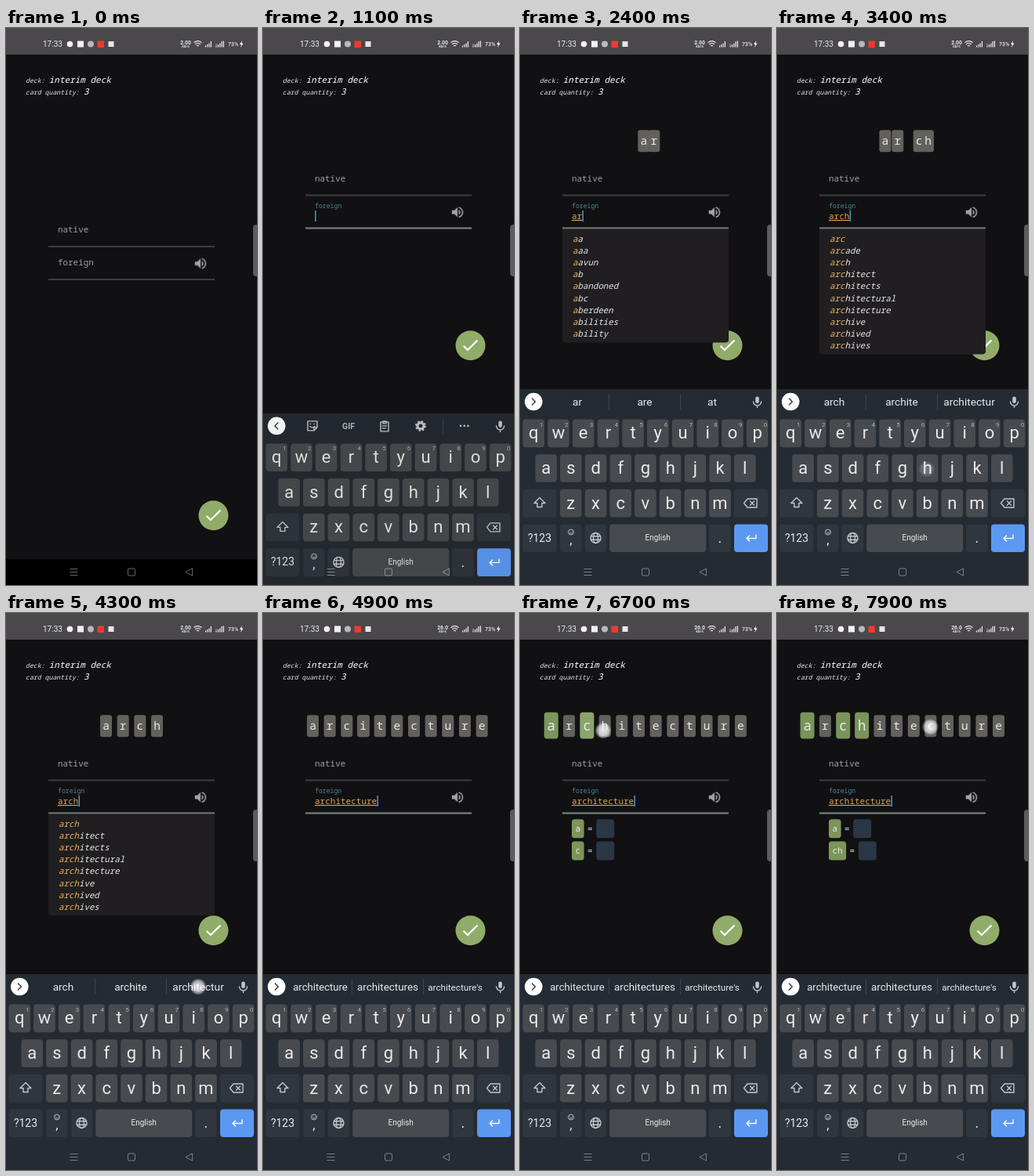
An HTML page for the animation above (8000 ms loop, 320 by 711 pixels).

```html
<!DOCTYPE html>
<html lang="en">
<head>
<meta charset="utf-8">
<title>Card editor</title>
<style>
html, body { margin: 0; width: 100%; height: 100%; overflow: hidden; background: #111012; }
svg { display: block; width: 320px; height: 711px; }
text { font-family: Roboto, sans-serif; fill: #e8eaec; }
.mono, .mono text { font-family: "Noto Sans Mono", monospace; }
.mid { text-anchor: middle; }
.it { font-style: italic; }
.line { fill: none; stroke: #c3c7ca; stroke-width: 1.4; stroke-linecap: round; stroke-linejoin: round; }
.nav { fill: none; stroke: #fff; stroke-opacity: .4; stroke-width: 1; }
#kb, #form, #fab, #label, #focus { animation: 8s linear infinite; }
#kb { animation-name: rise; }
#form { animation-name: lift; }
#fab { animation-name: hop; }
#label { animation-name: float; font-size: 10.9px; }
#focus { animation-name: show; }
@keyframes rise {
  0%, 11.1% { transform: translateY(250px); opacity: .6; animation-timing-function: cubic-bezier(.2, .6, .4, 1); }
  16.2%, 100% { transform: none; opacity: 1; }
}
@keyframes lift { 0%, 11.9% { transform: none; } 12%, 100% { transform: translateY(-65.5px); } }
@keyframes hop { 0%, 11.9% { transform: none; } 12%, 100% { transform: translateY(-217px); } }
@keyframes float {
  0%, 11% { transform: translate(66px, 303px); fill: #a09fa1; }
  13%, 100% { transform: translate(66px, 295px) scale(.75); fill: #4b8693; }
}
@keyframes show { 0%, 11% { opacity: 0; } 13%, 100% { opacity: 1; } }
</style>
</head>
<body>
<svg viewBox="0 0 320 711">
  <defs>
    <radialGradient id="glow">
      <stop offset="0" stop-color="#fff" stop-opacity=".85"/>
      <stop offset=".65" stop-color="#fff" stop-opacity=".65"/>
      <stop offset="1" stop-color="#fff" stop-opacity=".12"/>
    </radialGradient>
  </defs>
  <rect width="320" height="711" fill="#111012"/>
  <rect width="320" height="34" fill="#4a484b"/>
  <rect y="678" width="320" height="33" fill="#000"/>

  <g id="status">
    <text x="47" y="24" font-size="10">17:33</text>
    <circle cx="81.5" cy="20.5" r="3.8" fill="#f2f2f2"/>
    <rect x="91" y="16.5" width="8" height="8" fill="#f2f2f2"/>
    <circle cx="108" cy="20.5" r="4" fill="#b9b8ba"/>
    <rect x="116.5" y="16.5" width="8.5" height="8.5" fill="#f0392f"/>
    <rect x="130.5" y="17" width="7" height="7" fill="#e6e6e6"/>
    <text id="speed" class="mid" x="229" y="20.5" font-size="6.8" font-weight="700">2.00</text>
    <text class="mid" x="229" y="25" font-size="4.2" font-weight="700">KB/S</text>
    <g fill="none" stroke="#eee" stroke-width="1.2">
      <path d="M239.5 18.6q5-4 10 0M241.2 20.8q3.3-2.6 6.6 0M243 22.9q1.500-1.200 3 0"/>
      <path d="M254.500 24.500v-2m2.300 2v-3.500m2.300 3.500v-5m2.300 5v-7.500M268 24.500v-2m0-1v-1m2.500 4v-3.500m2.300 3.500v-5m2.300 5v-7.500m2.300 7.500v-8"/>
    </g>
    <text x="283" y="23" font-size="7" font-weight="500">73%</text>
    <path d="M301 16l-3 5h2l-1 4 3.500-5.500h-2.200z" fill="#fff"/>
  </g>

  <g class="mono it">
    <text x="25" y="70" font-size="8.2">deck:</text>
    <text x="54.700" y="70" font-size="11" font-weight="500" style="fill:#fff">interim deck</text>
    <text x="25" y="85" font-size="8.2">card quantity:</text>
    <text x="99" y="85" font-size="11" font-weight="500" style="fill:#fff">3</text>
  </g>

  <g id="fab">
    <circle cx="264.500" cy="622.300" r="19" fill="#91ab69"/>
    <path transform="translate(251.100 608.700) scale(1.1)" fill="#fff" d="M9 16.170L4.830 12l-1.420 1.410L9 19 21 7l-1.410-1.410z"/>
  </g>

  <g id="form" class="mono">
    <text x="66" y="261" font-size="10.9" style="fill:#a09fa1">native</text>
    <text id="label">foreign</text>
    <path d="M54 279h212M54 321h212" stroke="#6c6b6d"/>
    <path id="focus" d="M54 321h212" stroke="#8b989c" stroke-width="1.600"/>
    <path transform="translate(238.400 291.100) scale(.8)" fill="#a3a2a4" d="M3 9v6h4l5 5V4L7 9H3zm13.500 3c0-1.770-1.020-3.290-2.500-4.030v8.050c1.480-.730 2.500-2.250 2.500-4.020zM14 3.230v2.060c2.890.860 5 3.540 5 6.710s-2.110 5.850-5 6.710v2.060c4.010-.910 7-4.490 7-8.770s-2.990-7.860-7-8.770z"/>
  </g>
  <text id="typed" class="mono" x="66" y="244" font-size="11" text-decoration="underline" style="fill:#dea24c"></text>
  <rect id="caret" y="233" width="1.500" height="14" fill="#4e9cbd"/>
  <g id="list" class="mono it"></g>
  <g id="pairs" class="mono"></g>
  <g id="tiles" class="mono"></g>
  <rect x="315" y="251" width="9" height="66" rx="4" fill="#5d5c5e"/>

  <g id="kb">
    <rect y="461" width="320" height="300" fill="#252b32"/>
    <circle cx="17.300" cy="477" r="11.300" fill="#fff"/>
    <path id="chevron" class="line" style="stroke:#33383d"/>
    <g id="tools" class="line">
      <path d="M57 471h12v8l-4 4h-8zM65 483v-4h4M60 474.500h.500M65 474.500h.500M60 477.500q3 3 6 0"/>
      <text class="mid" x="109" y="481" font-size="10.500" font-weight="700" stroke="none" style="fill:#b4b9bd">GIF</text>
      <path d="M150 472h10v12h-10zM153 471h4v3h-4zM152.500 477h5M152.500 480h4"/>
      <circle cx="201" cy="477" r="4" stroke-width="3.200"/>
      <circle cx="201" cy="477" r="6" stroke-width="2" stroke-dasharray="2.300 2.410" stroke-linecap="butt"/>
      <path d="M229.500 467v20" stroke="#3d4349" stroke-width="1"/>
      <path d="M252 477h.010M256.700 477h.010M261.400 477h.010" stroke-width="2.600"/>
    </g>
    <g id="hints"></g>
    <g class="line">
      <rect x="300.200" y="470.500" width="4.600" height="8.500" rx="2.300" fill="#c3c7ca" stroke="none"/>
      <path d="M297.500 477a5 5 0 0 0 10 0M302.500 482v2.500"/>
    </g>
    <g id="keys"></g>
    <g class="line">
      <path d="M25 599.500l7 7h-4v5h-6v-5h-4z"/>
      <path d="M290 601h12v11h-12l-4.500-5.500zM293.500 604l5 5m0-5l-5 5"/>
      <circle cx="96.500" cy="651" r="6.500"/>
      <ellipse cx="96.500" cy="651" rx="3" ry="6.500"/>
      <path d="M90.500 648.700h12M90.500 653.300h12"/>
      <g stroke-width=".9"><circle cx="65" cy="643.500" r="3.500"/><path d="M63.500 642.500h.010M66.500 642.500h.010M63.300 644.600q1.700 1.700 3.400 0"/></g>
      <path d="M301 647v4.500h-12m3.500-3.500l-3.500 3.500 3.500 3.500" stroke="#fff"/>
    </g>
  </g>
  <path class="nav" d="M81.500 690.500h10M81.500 694.500h10M81.500 698.500h10M237.500 690v9l-8.500-4.500z"/>
  <rect class="nav" x="155.500" y="690" width="9" height="9" rx="1.500"/>
  <circle id="tap" r="10.300" fill="url(#glow)"/>
</svg>

<script>
const $ = id => document.getElementById(id);
const clamp = p => Math.max(0, Math.min(1, p));
const mix = (a, b, p) => a + (b - a) * p;

// cubic-bezier(.25, .1, .25, 1)
function ease(p) {
  p = clamp(p);
  let s = p;
  for (let i = 0; i < 6; i++) s -= (.75 * s * (1 - s) + s ** 3 - p) / (.75 - 1.5 * s + 3 * s * s);
  return .3 * s * (1 - s) ** 2 + 3 * s * s * (1 - s) + s ** 3;
}

const LOOP = 8000, WORD = "architecture", PITCH = 21.65, GROW = 2.3;
const GREY = [98, 97, 92], LIT = [138, 165, 108], GREEN = [122, 147, 90];

// time, typed letters, suggestions
const typing = [
  [0, 0, ""],
  [1880, 1, "a and at"],
  [2290, 2, "ar are at"],
  [2780, 3, "arc arch arcade"],
  [3360, 4, "arch archite architectur"],
  [4590, 12, "architecture architectures architecture's"]
];
// time, matched prefix, words
const lists = [
  [0, 0, ""],
  [1980, 1, "aa aaa aavun ab abandoned abc aberdeen abilities ability"],
  [2480, 2, "ar arab arabic arbitrary arbitration arc arcade arch architect architects"],
  [2980, 3, "arc arcade arch architect architects architectural architecture archive archived archives"],
  [3480, 4, "arch architect architects architectural architecture archive archived archives"],
  [4490, 0, ""]
];
const pairs = [[0, ""], [5950, "a"], [6400, "a c"], [6850, "a ch"]];
const chosen = { 0: 5950, 2: 6400, 3: 6850 };
// time, x, y, hold
const taps = [
  [780, 140, 300, 120], [1780, 33, 562, 120], [2180, 112, 517, 100], [2680, 128, 606, 120],
  [3180, 191, 563, 150], [4180, 245, 477, 200], [5780, 41, 146, 160], [6280, 85, 148, 140],
  [6580, 106, 150, 220], [7780, 195.5, 145.5, 300]
];

const latest = (rows, t) => rows.findLastIndex(r => r[0] <= t);

function buildKeys() {
  let out = "";
  const key = (x, w, row, label, fill = "#474b4f", size = 22) => {
    const y = 517.3 + 44.6 * row;
    out += `<rect x="${x - w / 2}" y="${y - 17.7}" width="${w}" height="35.6" rx="4" fill="${fill}"/>
      <text class="mid" x="${x}" y="${y + size * .32}" font-size="${size}">${label}</text>`;
  };
  ["qwertyuiop", "asdfghjkl", "zxcvbnm"].forEach((row, r) =>
    [...row].forEach((c, i) => key(17.3 + 31.7 * i + [0, 15.9, 47.5][r], 27.6, r, c)));
  for (let i = 0; i < 10; i++)
    out += `<text class="mid" x="${27.6 + 31.7 * i}" y="508.5" font-size="8" style="fill:#b0b5b9">${(i + 1) % 10}</text>`;
  const dark = "#30363d";
  key(25, 43, 2, "", dark);
  key(294.5, 43, 2, "", dark);
  key(25, 43, 3, "?123", dark, 14);
  key(64.8, 27.6, 3, "", dark);
  key(96.5, 27.6, 3, "", dark);
  key(175.7, 123, 3, "English", "#474b4f", 10);
  key(254.8, 27.6, 3, ".", dark, 18);
  key(294.5, 43, 3, "", "#5b98f2");
  out += `<text class="mid" x="65" y="659" font-size="17">,</text>`;
  $("keys").innerHTML = out;
}

const drawn = {};
function fill(id, state, html) {
  if (drawn[id] === state) return;
  drawn[id] = state;
  $(id).innerHTML = html();
}

function hintsHtml(words) {
  if (!words) return "";
  const list = words.split(" ");
  const sizes = list[0] === WORD ? [13.1, 13.4, 11.7] : [13.7, 13.7, 13.7];
  return `<path d="M113.5 467v20M204.5 467v20" stroke="#3d4349"/>` + list.map((w, i) =>
    `<text class="mid" x="${73 + 86 * i}" y="482" font-size="${sizes[i]}">${w}</text>`).join("");
}

function listHtml([, n, words]) {
  if (!words) return "";
  const list = words.split(" ");
  return `<path d="M54 256.500h212v${15.1 * list.length + 5}q0 4-4 4h-204q-4 0-4-4z" fill="#201e21"/>` +
    list.map((w, i) => `<text x="67" y="${273 + 15.1 * i}" font-size="10.8"><tspan fill="#eeb35c" font-weight="500">${w.slice(0, n)}</tspan>${w.slice(n)}</text>`).join("");
}

function pairsHtml(names) {
  return names.split(" ").filter(Boolean).map((s, i) => {
    const y = 263.3 + 28.1 * i, w = 9 + 6.6 * s.length;
    return `<rect x="66" y="${y}" width="${w}" height="24" rx="3.500" fill="#7c955b"/>
      <text class="mid" x="${66 + w / 2}" y="${y + 15.5}" font-size="11">${s}</text>
      <text class="mid" x="${73.7 + w}" y="${y + 15.5}" font-size="11">=</text>
      <rect x="${81.6 + w}" y="${y}" width="23" height="24" rx="3.500" fill="#2a3746"/>`;
  }).join("");
}

const slot = (i, n) => 160 + (i - (n - 1) / 2) * PITCH;

function tileX(i, k, t) {
  const [start, n] = typing[k], before = typing[k - 1][1];
  if (i >= before) return slot(i, n);
  const from = n === 4 && i === 1 ? 154 : slot(i, before);
  return mix(from, slot(i, n), ease((t - start) / 700));
}

function drawTiles(t, k) {
  const grown = [...WORD].map((_, i) => i in chosen ? ease((t - chosen[i]) / 280) : 0);
  const total = grown.reduce((a, b) => a + b);
  let left = 0;
  tiles.forEach((g, i) => {
    const on = k > 0 && i < typing[k][1], p = grown[i];
    g.style.display = on ? "" : "none";
    if (!on) return;
    const x = tileX(i, k, t) + GROW * (left + p / 2 - total / 2);
    left += p;
    const settle = p ? clamp((t - chosen[i] - 300) / 500) : 0;
    const rgb = GREY.map((c, j) => Math.round(mix(mix(c, LIT[j], p), GREEN[j], settle)));
    g.setAttribute("transform", `translate(${x} ${144.2 - .6 * p}) scale(${1 + .2 * p})`);
    g.firstChild.setAttribute("fill", `rgb(${rgb})`);
  });
}

function caretOn(t) {
  if (t < 1880) return t > 990 && t < 1480;
  return t < 5080 || Math.floor((t - 5080) / 503) % 2 === 1;
}

function render(t) {
  const k = latest(typing, t), [, n, hints] = typing[k];
  $("typed").textContent = WORD.slice(0, n);
  $("caret").setAttribute("x", 66.2 + 6.6 * n);
  $("caret").style.display = caretOn(t) ? "" : "none";
  $("speed").textContent = t < 4480 ? "2.00" : "26.0";
  $("tools").style.display = n ? "none" : "";
  $("chevron").setAttribute("d", n ? "M15.500 473l4 4-4 4" : "M19 473l-4 4 4 4");
  fill("hints", k, () => hintsHtml(hints));
  const l = latest(lists, t);
  fill("list", l, () => listHtml(lists[l]));
  const p = latest(pairs, t);
  fill("pairs", p, () => pairsHtml(pairs[p][1]));
  drawTiles(t, k);

  const tap = taps[latest(taps, t)];
  $("tap").style.opacity = tap ? 1 - clamp((t - tap[0] - tap[3]) / 100) : 0;
  if (tap) $("tap").setAttribute("transform", `translate(${tap[1]} ${tap[2]})`);
}

buildKeys();
$("tiles").innerHTML = [...WORD].map(c =>
  `<g><rect x="-7.500" y="-14" width="15" height="28" rx="3"/><text class="mid" y="5" font-size="14.500">${c}</text></g>`).join("");
const tiles = [...$("tiles").children];

let start;
function tick(now) {
  start ??= now;
  render((now - start) % LOOP);
  requestAnimationFrame(tick);
}
render(0);
requestAnimationFrame(tick);
</script>
</body>
</html>
```
